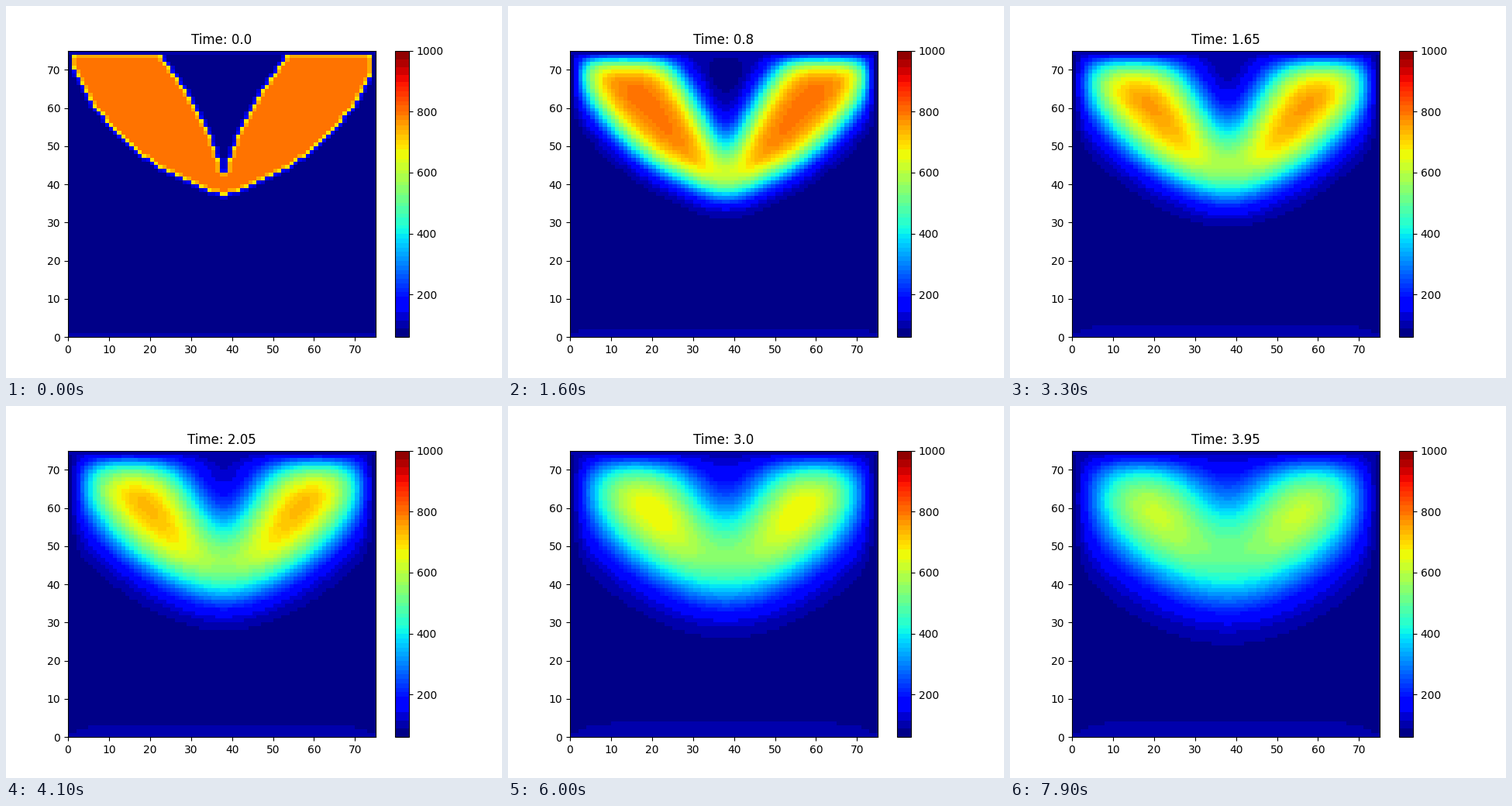
Recreate the animation shown at these times as a matplotlib script. Size 640x480 px, loop 8 s.

```python
import numpy as np
import matplotlib.pyplot as plt
from matplotlib.animation import FuncAnimation
from matplotlib.colors import ListedColormap

N = 75
FRAMES = 80
DT = 0.05
SUBSTEPS = 5
R = 0.0775              # diffusion number of one substep
COOL, EDGE, HOT = 70, 100, 800
VMIN, VMAX = 60, 1000


def start_field():
    """Two hot wings on a cool plate, with warm top and bottom edges."""
    centre = np.arange(N) + 0.5
    d = np.abs(centre - 38)[None, :]
    row = centre[:, None]
    lower = 92 - np.sqrt(57**2 - (d + 16)**2)
    upper = 38 + 6.9 * d**0.6
    u = np.where((row >= lower) & (row <= upper), HOT, COOL).astype(float)
    u[:, [0, -1]] = COOL
    u[[0, -1], :] = EDGE
    return u


def diffuse(u):
    v = u.copy()
    v[1:-1, 1:-1] += R * (u[2:, 1:-1] + u[:-2, 1:-1] + u[1:-1, 2:]
                          + u[1:-1, :-2] - 4 * u[1:-1, 1:-1])
    return v


def simulate():
    u = diffuse(start_field())
    fields = [u]
    for _ in range(FRAMES - 1):
        for _ in range(SUBSTEPS):
            u = diffuse(u)
        fields.append(u)
    return fields


def banded_jet(field):
    """Jet reduced to bands, each the mean of its shades weighted by use."""
    rgb = plt.get_cmap("jet")(np.arange(256), bytes=True)[:, :3].astype(int)
    index = ((field - VMIN) / (VMAX - VMIN) * 256).astype(int).clip(0, 255)
    weight = 26 * np.bincount(index.ravel(), minlength=256) + 27
    key = rgb // [32, 16, 32] @ [256, 16, 1]
    out = np.empty((256, 3))
    for k in np.unique(key):
        band = key == k
        out[band] = np.average(rgb[band], axis=0, weights=weight[band])
    return ListedColormap(out / 255)


fields = simulate()
fig, ax = plt.subplots(figsize=(6.4, 4.8), dpi=100)
mesh = ax.pcolormesh(fields[0], cmap=banded_jet(fields[0]),
                     vmin=VMIN, vmax=VMAX)
fig.colorbar(mesh, ax=ax)
title = ax.set_title("Time: 0.0")


def update(i):
    mesh.set_array(fields[i])
    title.set_text(f"Time: {round(i * DT, 2)}")
    return mesh, title


anim = FuncAnimation(fig, update, frames=FRAMES, interval=100, repeat=True,
                     repeat_delay=0)
plt.show()
```
